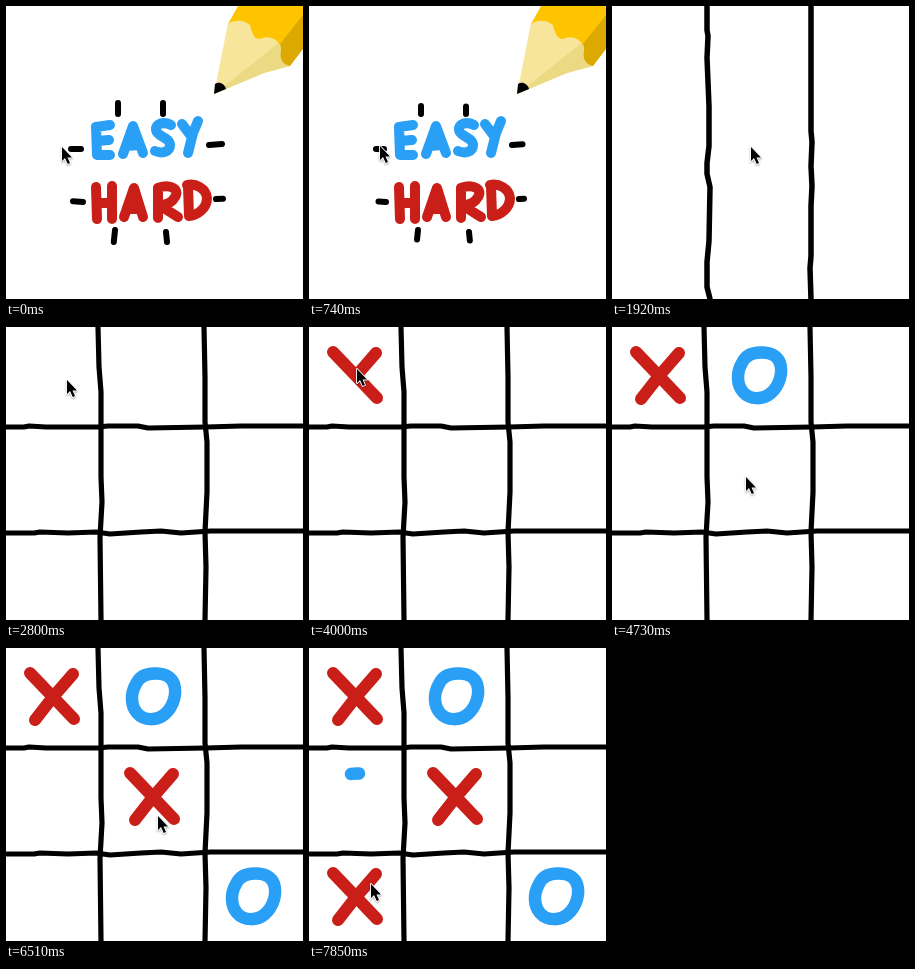
Animation of 297 by 293 pixels, one loop 7.99 s. Source, as an HTML page with a canvas:

```html
<!DOCTYPE html>
<html lang="en">
<head>
<meta charset="utf-8">
<title>Easy or hard</title>
<style>
html, body { margin: 0; width: 100%; height: 100%; overflow: hidden; background: #fff; }
canvas { display: block; }
</style>
</head>
<body>
<canvas id="stage" width="297" height="293"></canvas>
<script>
const ctx = document.getElementById('stage').getContext('2d');
const LOOP = 7990, STEP = 148;
const RED = '#c91f18', BLUE = '#2a9ff6', BLACK = '#000';

const EASY = 'M104 119L90 121L91 149L104 149M91 135L103 134' +
  'M117 148L127 120L137 147M121 140L133 139' +
  'M165 119C157 115 149 118 150 124C151 131 164 131 164 139C164 146 156 148 149 145' +
  'M176 118L185 130M192 115L187 127L182 147';
const HARD = 'M90 181L91 213M106 180L106 213M91 197L106 197' +
  'M118 211L128 182L137 211M121 203L134 203' +
  'M152 212L152 182C165 177 174 184 169 191C166 197 160 199 153 199L172 211' +
  'M182 180L183 210C192 209 201 202 201 192C200 182 189 177 181 179';

const SKETCH = [
  'M95 0L95 24L96 30L95 52L97 100L97 140L95 157L95 168L98 181L97 235L95 256L95 281L98 293',
  'M199 0L199 125L200 136L199 160L200 180L199 200L199 250L198 262L199 293'
];
const GRID = [
  'M92 0L93 40L95 65L95 98L95 150L96 175L94 210L95 293',
  'M198 0L199 50L199 95L201 115L201 165L199 205L200 240L199 293',
  'M0 100L18 100L23 99L40 100L92 100L102 99L132 99L142 101L200 100L235 99L297 99',
  'M0 206L28 206L34 205L62 206L90 205L104 207L135 205L155 204L175 206L205 204L297 204'
];

const RING = 'M151 25.5C143 25 134 27 130 36C124 46 125 58 131 65C138 73 151 73 159 66' +
  'C168 58 171 45 168 36C165 28 159 26 151 25.5Z';
const CROSS = ['M24 25L47 49L68 71', 'M67 26L47 49L29 72'];

// Rays: inner end, direction, shortest and longest length
const RAYS = [
  [112, 108, 0, -1, 5, 11], [157, 108, 0, -1, 4, 11],
  [75, 143, -1, 0, 6, 10], [203, 139, 1, -.08, 8, 13],
  [77, 196, -1, -.08, 5, 10], [210, 193, 1, -.05, 3, 7],
  [109, 224, -.1, 1, 7, 12], [160, 226, .1, 1, 7, 10]
];

// Moves: step, x, y of the pointer tip
const POINTER = [
  [0, 55, 140], [4, 55, 140], [9, 132, 136], [10, 134, 137], [11, 138, 140],
  [14, 138, 140], [16, 132, 135], [17, 102, 98], [18, 60, 52], [19, 45, 34],
  [21, 45, 34], [23, 47, 41], [28, 47, 41], [32, 133, 149], [33, 133, 149],
  [34, 151, 167], [45, 151, 167], [49, 61, 235], [54, 61, 235]
];

// Marks: first step, offset
const CROSSES = [[26, 0, 0], [38, 100, 100], [50, 0, 200]];
const RINGS = [[29, 0, 0], [41, 100, 200], [53, -101, 100]];

function stroke(path, color, width, length) {
  ctx.strokeStyle = color;
  ctx.lineWidth = width;
  ctx.setLineDash(length ? [length, 999] : []);
  ctx.stroke(new Path2D(path));
}

function fill(path, color) {
  ctx.fillStyle = color;
  ctx.fill(new Path2D(path));
}

function at(x, y, draw) {
  ctx.save();
  ctx.translate(x, y);
  draw();
  ctx.restore();
}

function pencil() {
  fill('M208 88L222 17L240 10L278 38L284 60L258 67Z', '#f6e59b');
  fill('M208 88L221 78L274 36L284 60L258 67Z', '#ebda83');
  fill('M232 0L222 18C229 13 238 14 244 19C246 27 248 33 254 33' +
    'C262 29 270 32 274 39L297 12V0Z', '#ffc400');
  fill('M297 9L274 38C277 44 272 50 277 56C279 59 282 59 284 60L297 43Z', '#dba900');
  fill('M208 88L209 78C213 75 219 78 220 83Z', BLACK);
}

function menu(k) {
  pencil();
  const grow = Math.abs(k % 4 - 2) / 2;
  for (const [x, y, dx, dy, min, max] of RAYS) {
    const r = min + (max - min) * grow;
    stroke(`M${x} ${y}L${x + dx * r} ${y + dy * r}`, BLACK, 6);
  }
  stroke(EASY, BLUE, 10);
  stroke(HARD, RED, 10);
}

function board(k) {
  const lines = k < 14 ? SKETCH : GRID;
  lines.forEach((path, i) => {
    const partial = k === 12 && i < 2 || k === 14 && i > 1;
    stroke(path, BLACK, k < 14 ? 5.5 : 5.2, partial ? 150 : 0);
  });
  for (const [start, x, y] of CROSSES) {
    const n = k - start;
    if (n >= 0) at(x, y, () => {
      stroke(CROSS[0], RED, 12, n ? 0 : 35);
      if (n > 0) stroke(CROSS[1], RED, 12, n > 1 ? 0 : 30);
    });
  }
  for (const [start, x, y] of RINGS) {
    const n = k - start;
    if (n >= 0) at(x, y, () => stroke(RING, BLUE, 12.5, [8, 55, 105][n]));
  }
}

function pointer(k) {
  const i = POINTER.findIndex(p => p[0] > k);
  const [k0, x0, y0] = POINTER[i - 1], [k1, x1, y1] = POINTER[i];
  const p = (k - k0) / (k1 - k0);
  const shape = 'M1 1V15L4 12L6.8 18L9 17L6.5 11.5H11Z';
  at(Math.round(x0 + (x1 - x0) * p), Math.round(y0 + (y1 - y0) * p), () => {
    ctx.shadowColor = 'rgba(0,0,0,.35)';
    ctx.shadowBlur = 2;
    ctx.shadowOffsetY = 1;
    stroke(shape, '#fff', 1.8);
    ctx.shadowColor = 'transparent';
    fill(shape, BLACK);
  });
}

function frame(now) {
  const k = Math.min(53, Math.floor((now % LOOP + 9) / STEP));
  ctx.fillStyle = '#fff';
  ctx.fillRect(0, 0, 297, 293);
  ctx.lineCap = ctx.lineJoin = 'round';
  if (k < 12) menu(k);
  else board(k);
  pointer(k);
}

let begin;
function tick(now) {
  begin ??= now;
  frame(now - begin);
  requestAnimationFrame(tick);
}
frame(0);
requestAnimationFrame(tick);
</script>
</body>
</html>
```
